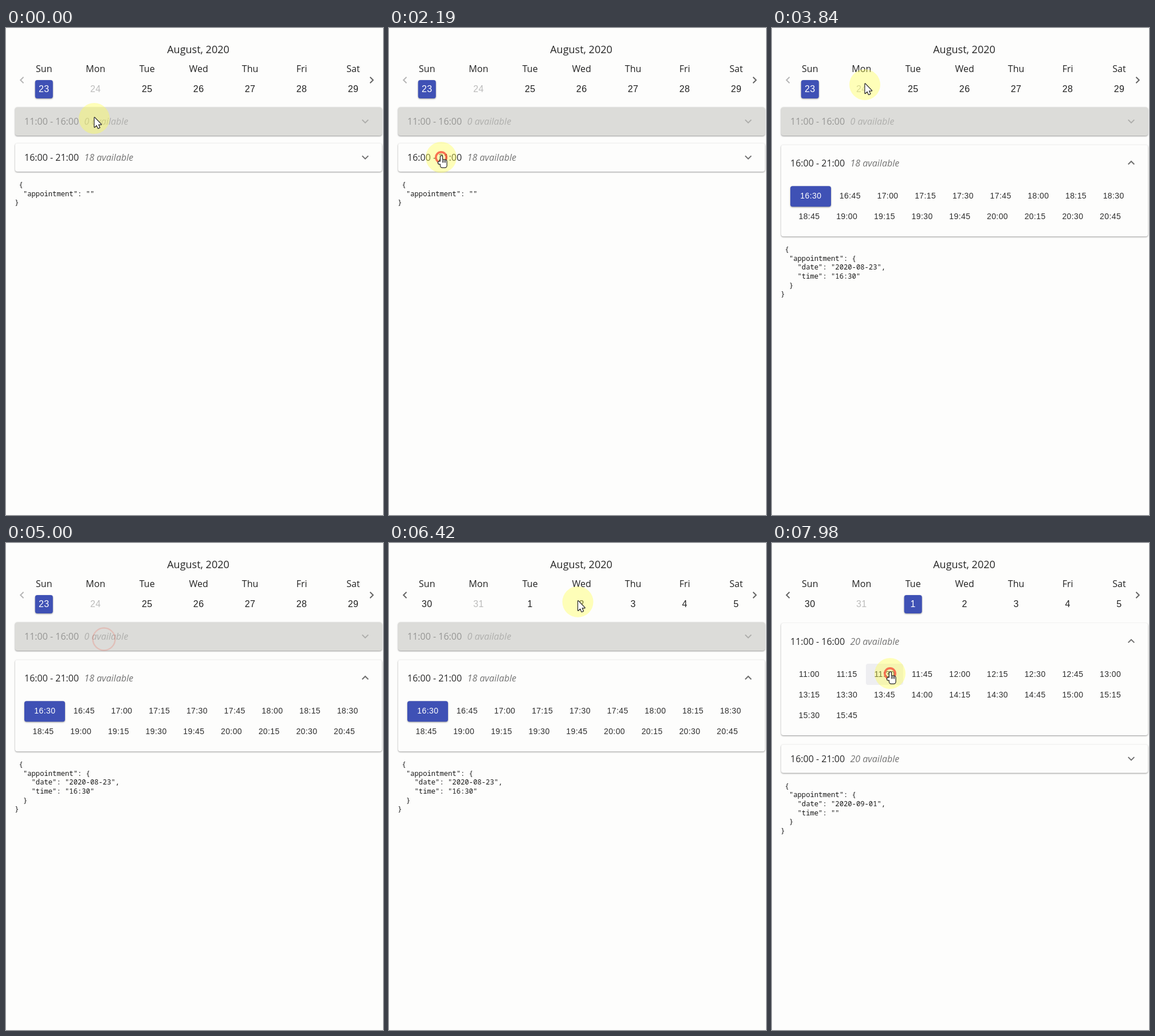
Recreate the animation shown at these times as an HTML page with a canvas. Size 658x851 px, loop 8000 ms.

```html
<!DOCTYPE html>
<html lang="en">
<head>
<meta charset="utf-8">
<title>Appointment picker</title>
<style>
  html, body { margin: 0; width: 100%; height: 100%; overflow: hidden; background: #fdfdfc; }
  canvas { display: block; }
</style>
</head>
<body>
<canvas id="stage" width="658" height="851"></canvas>
<script>
const ctx = document.getElementById('stage').getContext('2d');
const LOOP = 8000, TRAVEL = 450, REACTION = 100, RING = 330;
const LABEL = '"Open Sans", "Noto Sans", sans-serif';
const BUTTON = '"Liberation Sans", Arial, sans-serif';
const MONO = '"Noto Sans Mono", "DejaVu Sans Mono", monospace';
const PAGE = '#fdfdfc', BLUE = '#3f51b5';

const black = a => `rgba(0,0,0,${a})`;
const ease = p => p * p * (3 - 2 * p);
const clamp = p => Math.min(1, Math.max(0, p));
const ramp = (t, start, length) => ease(clamp((t - start) / length));
const mix = (a, b, p) => a + (b - a) * p;
const dayX = i => 66.3 + 89.95 * i;

// Places the pointer visits; "live" ones respond to the click
const visit = (arrive, x, y, click, live = false) => ({ arrive, x, y, click, live });
const disabledPanel = visit(0, 154, 158);
const eveningHeader = visit(2050, 91, 226, 2130, true);
const firstSlot = visit(3000, 62, 290, 3090, true);
const nextArrow = visit(5650, 638, 91, 5760, true);
const tuesday = visit(6555, 246, 106, 6790, true);
const dayHeader = visit(7160, 180, 168, 7200, true);
const thirdSlot = visit(7860, 206, 228, 7920, true);
const VISITS = [disabledPanel, visit(1350, 156, 110), eveningHeader, firstSlot,
                visit(3840, 162, 99), visit(4600, 171, 168, 4740),
                nextArrow, tuesday, dayHeader, thirdSlot];
const done = (t, place) => t >= place.click + REACTION;

function text(string, x, y, font, color, align = 'left', spacing = 0) {
  ctx.font = font;
  ctx.fillStyle = color;
  ctx.textAlign = align;
  ctx.letterSpacing = spacing + 'px';
  ctx.fillText(string, x, Math.round(y));
}

function box(x, y, w, h, fill, shadow = 0) {
  ctx.save();
  ctx.shadowColor = black(shadow);
  ctx.shadowBlur = 2.5;
  ctx.shadowOffsetY = 1;
  ctx.fillStyle = fill;
  ctx.beginPath();
  ctx.roundRect(x, y, w, h, 4);
  ctx.fill();
  ctx.restore();
}

// Points downwards at angle 0
function chevron(x, y, angle, alpha) {
  ctx.save();
  ctx.translate(x, y);
  ctx.rotate(angle);
  ctx.strokeStyle = black(alpha);
  ctx.lineWidth = 2;
  ctx.beginPath();
  ctx.moveTo(-5.3, -2.6);
  ctx.lineTo(0, 2.7);
  ctx.lineTo(5.3, -2.6);
  ctx.stroke();
  ctx.restore();
}

function calendar(t) {
  const later = done(t, nextArrow);
  const selected = !later ? 0 : done(t, tuesday) ? 2 : -1;
  text('August, 2020', 335.5, 44, `18px ${LABEL}`, black(.85), 'center');
  ['Sun', 'Mon', 'Tue', 'Wed', 'Thu', 'Fri', 'Sat'].forEach((name, i) => {
    const x = dayX(i), on = i === selected;
    const date = later ? (29 + i) % 31 + 1 : 23 + i;
    text(name, x, 77, `16px ${LABEL}`, black(.87), 'center');
    if (on) box(x - 15.5, 91, 31, 32, BLUE, .4);
    text(date, x, 112, `16px ${BUTTON}`, on ? '#fff' : black(i === 1 ? .26 : .87), 'center', .4);
  });
  chevron(28, 91, Math.PI / 2, later ? .6 : .28);
  chevron(638, 91, -Math.PI / 2, .6);
}

function slots(top, first, count, picked, hovered) {
  for (let i = 0; i < count; i++) {
    const row = Math.floor(i / 9), col = i % 9;
    const y = top + 89 + row * 36, minutes = first + i * 15;
    const on = i === picked;
    const shift = picked < 0 || row ? 0 : on ? 2.8 : 5.6;
    const x = 65 + col * 65.7 + shift;
    if (on) box(x - 35.8, y - 17, 71, 36, BLUE, .4);
    else if (i === hovered) box(x - 32.5, y - 18, 65, 37, '#eeeef1');
    const label = Math.floor(minutes / 60) + ':' + String(minutes % 60).padStart(2, '0');
    text(label, x, y + 5, `14px ${BUTTON}`, on ? '#fff' : black(.82), 'center', .4);
  }
}

function panel(top, height, open, hours, available, disabled, drawSlots) {
  const middle = top + mix(25, 32, open), fade = disabled ? .38 : 1;
  box(16, top, 640, height, disabled ? '#dcdcd9' : PAGE, .42);
  text(hours, 32, middle + 5.5, `16px ${LABEL}`, black(.84 * fade));
  text(available + ' available', 136.5, middle + 5.5, `italic 16px ${LABEL}`, black(.54 * fade));
  chevron(627, middle - .5, open * Math.PI, .56 * fade);
  if (open > 0) {
    ctx.save();
    ctx.beginPath();
    ctx.rect(16, top, 640, height);
    ctx.clip();
    drawSlots();
    ctx.restore();
  }
}

function json(t, baseline) {
  const appointment = !done(t, firstSlot) ? ''
    : done(t, tuesday) ? { date: '2020-09-01', time: '' }
    : { date: '2020-08-23', time: '16:30' };
  const lines = (' ' + JSON.stringify({ appointment }, null, 2)).split('\n');
  lines.forEach((line, i) => text(line, 15.3, baseline + i * 15.6, `12.2px ${MONO}`, black(.9)));
}

function panels(t) {
  const dated = done(t, tuesday), count = dated ? 20 : 18;
  const dayOpen = ramp(t, dayHeader.click + REACTION, 270);
  const eveningOpen = ramp(t, eveningHeader.click + REACTION, 270) - dayOpen;
  const height = (open, n) => mix(49.5, 88 + 36 * Math.ceil(n / 9), open);
  const dayTop = 138.5 + 1.5 * dayOpen;
  const dayHeight = height(dayOpen, 20);
  const eveningTop = dayTop + dayHeight + 13.5 + 2.7 * Math.max(dayOpen, eveningOpen);
  const eveningHeight = height(eveningOpen, count);
  const picked = done(t, firstSlot) && !dated ? 0 : -1;

  panel(dayTop, dayHeight, dayOpen, '11:00 - 16:00', dated ? 20 : 0, !dated,
        () => slots(dayTop, 660, 20, -1, t > thirdSlot.arrive - 80 ? 2 : -1));
  panel(eveningTop, eveningHeight, eveningOpen, '16:00 - 21:00', count, false,
        () => slots(eveningTop, dated ? 960 : 990, count, picked,
                    t > firstSlot.arrive - 80 && !dated ? 0 : -1));
  json(t, eveningTop + eveningHeight + 27);
}

const arrow = new Path2D('M0 0V16.5L3.8 13L6.3 18.6L8.8 17.5L6.3 12H11.5Z');
const hand = new Path2D();
hand.roundRect(-1.5, -1, 3, 14, 1.5);
hand.roundRect(-1.5, 6, 10.5, 13, 3);
hand.roundRect(-5.5, 9, 8, 4, 2);

function drawPointer(x, y, live) {
  ctx.save();
  ctx.translate(x + .5, y - 1.5);
  ctx.fillStyle = '#fff';
  ctx.strokeStyle = '#222';
  ctx.lineJoin = 'round';
  ctx.lineWidth = 2.4;
  ctx.stroke(live ? hand : arrow);
  ctx.fill(live ? hand : arrow);
  ctx.lineWidth = 1.2;
  for (let knuckle = 2; live && knuckle < 8; knuckle += 2.5) {
    ctx.strokeRect(knuckle, 6.5, 0, 4);
  }
  ctx.restore();
}

function pointer(t) {
  const i = VISITS.findLastIndex(place => t >= place.arrive - TRAVEL);
  const place = VISITS[i], from = VISITS[Math.max(0, i - 1)];
  const travelled = ramp(t, place.arrive - TRAVEL, TRAVEL);
  const x = mix(from.x, place.x, travelled), y = mix(from.y, place.y, travelled);
  const age = (t - place.click) / RING;
  const ringing = age >= 0 && age < 1;
  // A click on something disabled hides the pointer for a moment
  const visible = place.live || !ringing || age < .66;

  if (visible) {
    ctx.fillStyle = 'rgba(255,255,75,.39)';
    ctx.beginPath();
    ctx.arc(x, y, 27, 0, 7);
    ctx.fill();
  }
  if (ringing) {
    ctx.strokeStyle = `rgba(245,70,50,${.92 * (1 - age)})`;
    ctx.lineWidth = mix(4, 2, age);
    ctx.beginPath();
    ctx.arc(x, y, 6 + 17 * age, 0, 7);
    ctx.stroke();
  }
  if (visible) drawPointer(x, y, travelled < .1 ? from.live : place.live && travelled > .9);
}

function draw() {
  const t = performance.now() % LOOP;
  ctx.fillStyle = PAGE;
  ctx.fillRect(0, 0, 658, 851);
  calendar(t);
  panels(t);
  pointer(t);
  requestAnimationFrame(draw);
}
draw();
</script>
</body>
</html>
```
